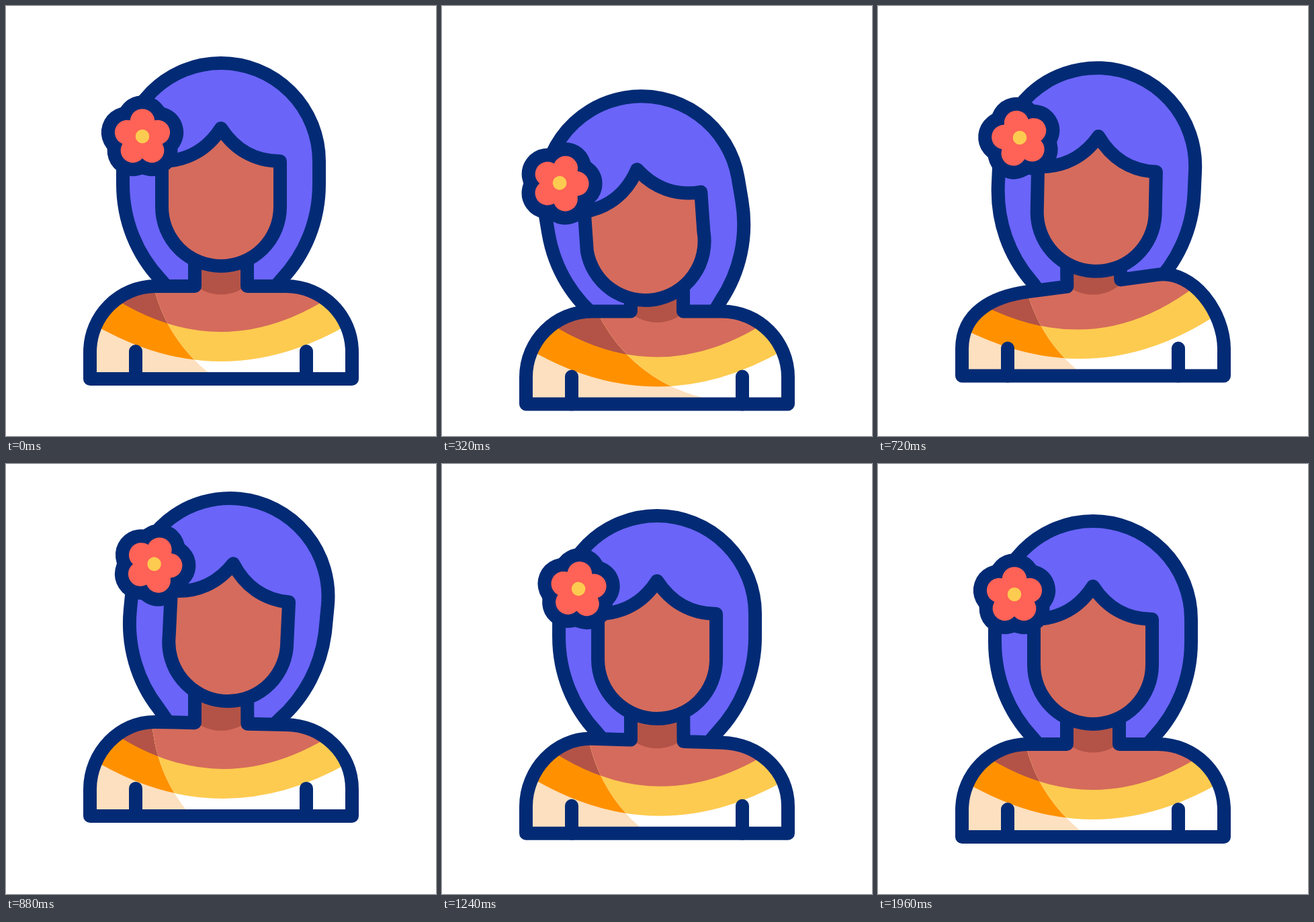
Animation, 640 px wide and 640 px high, one loop 2 s. Source, as an HTML page:

```html
<!DOCTYPE html>
<html lang="en">
<head>
<meta charset="utf-8">
<title>Woman with a flower</title>
<style>
  html, body { margin: 0; width: 100%; height: 100%; overflow: hidden; background: #fff; }
  svg { display: block; width: 100vw; height: 100vh; }
  .line { stroke: #032b75; stroke-width: 20; stroke-linecap: round; stroke-linejoin: round; }
  .bare { fill: none; }
  .hair { fill: #6a64f8; }
  .face { fill: #d56b5c; }
  .lit { --skin: #d56b5c; --band: #fdcb50; --cloth: #fff; }
  .shade { --skin: #b35347; --band: #ff9100; --cloth: #fde0bf; }
  #cloth { fill: var(--cloth); }
  #band { fill: var(--band); }
  #skin { fill: var(--skin); }
</style>
</head>
<body>
<svg viewBox="0 0 640 640">
  <defs>
    <g id="dress">
      <path id="cloth" d="M90 200H550V600H90Z"/>
      <path id="band" d="M90 448Q320 610 550 448V200H90Z"/>
      <path id="skin" d="M90 381Q320 589 550 381V200H90Z"/>
    </g>
    <clipPath id="bodyClip"><path id="bodyArea"/></clipPath>
    <clipPath id="lightClip"><circle id="light" r="235"/></clipPath>
    <g id="petals"></g>
  </defs>

  <g id="hair">
    <path class="line hair" d="M258 440L230 407C195 370 174 320 174 265V231A146 146 0 0 1 466 231V265C466 320 445 370 410 407L382 440"/>
  </g>

  <g id="body">
    <g clip-path="url(#bodyClip)">
      <use href="#dress" class="shade"/>
      <g clip-path="url(#lightClip)"><use href="#dress" class="lit"/></g>
      <circle id="chinShade" cx="320" r="62" fill="#b35347"/>
    </g>
    <path id="bodyLine" class="line bare"/>
    <path class="line bare" d="M193 514V555M447 514V555"/>
  </g>

  <g id="head">
    <path id="face" class="line face"/>
    <g id="flower">
      <use href="#petals" fill="#032b75" stroke="#032b75" stroke-width="40"/>
      <use href="#petals" fill="#ff6256"/>
      <circle r="10.3" fill="#fdcb50"/>
    </g>
  </g>
</svg>

<script>
const LOOP = 2000, STEP = 40;
// Moments of the dance: deepest dip, highest rise, back at rest
const LOW = 520, HIGH = 985, REST = 1325;

const $ = id => document.getElementById(id);
const set = (id, name, value) => $(id).setAttribute(name, value);

const linear = u => u;
const outSine = u => Math.sin(u * Math.PI / 2);
const outQuad = u => 1 - (1 - u) ** 2;
const outCubic = u => 1 - (1 - u) ** 3;
const swing = u => (1 - Math.cos(u * Math.PI)) / 2;

// Chain of moves from 0, each given as [end time, end value, easing]
const chain = (...moves) => t => {
  let t0 = 0, v0 = 0;
  for (const [t1, v1, ease] of moves) {
    if (t < t1) return v0 + (v1 - v0) * ease((t - t0) / (t1 - t0));
    [t0, v0] = [t1, v1];
  }
  return v0;
};

const bodyY = chain([LOW, 61, linear], [HIGH, -36, outQuad], [REST, 0, swing]);
const headY = chain([LOW + 20, 80, linear], [HIGH, -43, outSine], [REST, -2, swing], [1760, 0, swing]);
const lean = chain([LOW, -15.6, linear], [940, 5.6, outCubic], [1440, -2.9, swing], [1800, 0, swing]);
const drop = chain([LOW + 20, 19, linear], [900, 0, outQuad]);
const tilt = chain([LOW, 0, linear], [700, -7.6, swing], [1040, 8.5, swing], [REST, 0, swing]);
const spin = chain([500, -84, linear], [1000, 28, outSine], [1460, -16, swing], [1960, 0, swing]);

function bodyPath(angle) {
  const a = angle * Math.PI / 180, c = Math.cos(a), s = Math.sin(a);
  // Shoulder point at a distance from the collar's middle
  const at = (x, shift = 0) => `${320 + x * c + shift} ${417 + x * s}`;
  const pull = Math.abs(angle) * 0.35;
  return `M125 555V515C125 461 ${at(-151)} ${at(-97)}L${at(-39)}L281 355H359` +
    `L${at(39, pull)}L${at(97)}C${at(151)} 515 461 515 515V555Z`;
}

// The fringe slides down by d, the chin sideways by x
function facePath(d, x) {
  const side = 231 + d, peak = 182 + d, dip = 213 + d, chin = 299 + d * 0.15;
  return `M232 ${side}L${232 + x} ${chin}a88 88 0 0 0 176 0L408 ${side}` +
    `C370 ${side} 340 ${dip} 320 ${peak}C300 ${dip} 270 ${side} 232 ${side}Z`;
}

function draw(t) {
  const y = bodyY(t), hy = headY(t), roll = lean(t), angle = tilt(t);
  const outline = bodyPath(angle);
  set('body', 'transform', `translate(0 ${y})`);
  set('bodyArea', 'd', outline);
  set('bodyLine', 'd', outline);
  set('skin', 'transform', `rotate(${angle * 0.72} 320 485)`);
  set('band', 'transform', `rotate(${angle * 0.45} 320 529)`);
  set('light', 'cx', 448 - 0.12 * y);
  set('light', 'cy', 362 - 1.2 * y);
  set('chinShade', 'cy', 367.5 + (hy - y) * 0.4);

  const pose = `translate(0 ${hy}) rotate(${roll} 320 371)`;
  set('hair', 'transform', pose);
  set('head', 'transform', pose);
  set('face', 'd', facePath(drop(t), roll * 0.6));
  set('flower', 'transform', `translate(203 194) rotate(${spin(t) - roll})`);
}

$('petals').innerHTML = '<circle cy="1.5" r="31.5"/>' + [0, 1, 2, 3, 4].map(i =>
  `<circle cy="-22.5" r="18.3" transform="rotate(${i * 72} 0 1.5)"/>`).join('');

const start = performance.now();
function tick() {
  const t = (performance.now() - start) % LOOP;
  draw(Math.floor(t / STEP) * STEP);
  requestAnimationFrame(tick);
}
draw(0);
requestAnimationFrame(tick);
</script>
</body>
</html>
```
